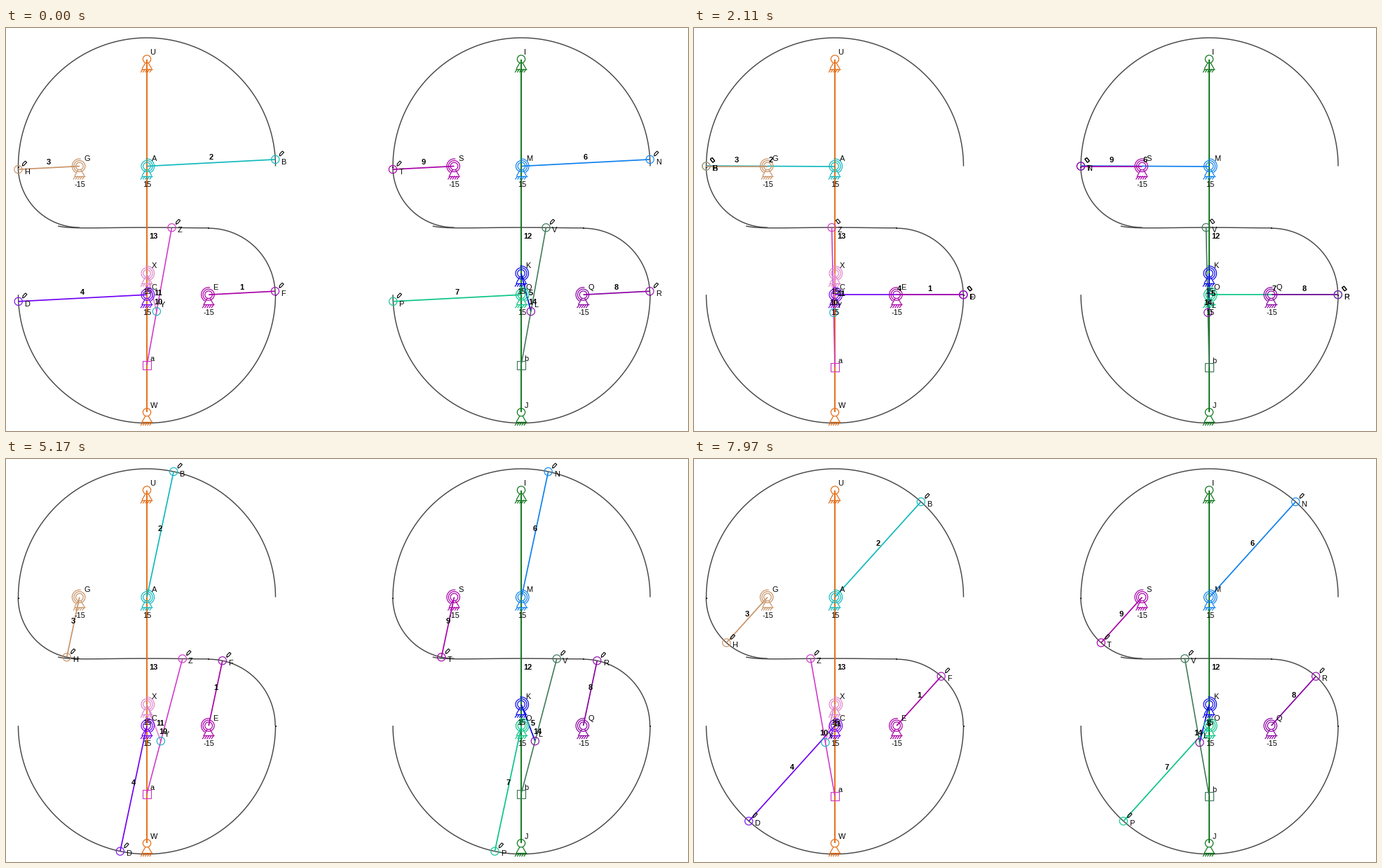
A matplotlib script for the animation above (8000 ms loop, 973 px wide and 576 px high).

```python
import numpy as np
import matplotlib.pyplot as plt
from matplotlib.animation import FuncAnimation

W, H, DPI = 973, 576, 100
LOOP, FRAMES, STEPS = 8000, 200, 103
PX = 72 / DPI
ARM_SHIFT, RAIL_SHIFT = 534.5, 534

plt.rcParams["font.family"] = "Liberation Sans"
fig = plt.figure(figsize=(W / DPI, H / DPI), dpi=DPI, facecolor="white")
ax = fig.add_axes([0, 0, 1, 1])
ax.set_xlim(-0.5, W - 0.5)
ax.set_ylim(H - 0.5, -0.5)
ax.axis("off")

# Left mechanism geometry; the right one is the same, shifted
CX = 200.5
TOP, BOT, CRANK = (CX, 197), (CX, 380.7), (CX, 350.2)
LEFT, RIGHT = (104.4, 197), (288.6, 380.7)
R_BIG, R_LEFT, R_RIGHT = 183.5, 87.6, 95
R_CRANK, ROD, RATIO = 56.1, 78, 2.56
SWING_LO, SWING_HI = -62, 38.2

# Arm travel in degrees at chosen steps, and crank travel against arm travel
STEP_KEYS = [0, 11, 18, 22, 33, 37, 44, 55, 66, 77, 88, 92, 99, 102]
ARM_KEYS = [-3, 72, 120, 147, 219, 243, 291, 360, 438, 510, 579, 603, 651, 672]
ARM_REF = [-3, 120, 243, 360, 510, 603, 672]
CRANK_REF = [76.3, 199.8, 324.5, 440.8, 590.2, 683.9, 753.6]


def bounce(x, span):
    """Back-and-forth travel between 0 and span."""
    x = x % (2 * span)
    return min(x, 2 * span - x)


def polar(c, r, deg):
    a = np.radians(deg)
    return c[0] + r * np.cos(a), c[1] - r * np.sin(a)


def shifted(p, dx):
    return p[0] + dx, p[1]


def swing(deg):
    """Crank pin, slider and tip for a crank angle measured from straight down."""
    a = np.radians(deg)
    dx = R_CRANK * np.sin(a)
    y = CRANK[1] + R_CRANK * np.cos(a)
    drop = np.sqrt(ROD ** 2 - dx ** 2)
    slide = y + drop
    return (CX + dx, y), (CX, slide), (CX + RATIO * dx, slide - RATIO * drop)


def line(xs, ys, color, lw=1.2, z=3):
    return ax.plot(xs, ys, color=color, lw=lw * PX, zorder=z,
                   solid_capstyle="butt", solid_joinstyle="miter")[0]


def text(x, y, s, ha="left", bold=False):
    return ax.text(x, y, s, ha=ha, va="baseline", size=11 * PX, color="black",
                   weight="bold" if bold else "normal", zorder=6)


def arc(c, r, a, b, color, lw=1.2, z=3):
    return line(*polar(c, r, np.linspace(a, b, 90)), color, lw, z)


RING = np.array(polar((0, 0), 5.6, np.linspace(0, 360, 40)))
BOX = np.array([[-6, 6, 6, -6, -6], [-6, -6, 6, 6, -6]])
PEN_UP = np.array([[-3, -2.6, 1, 3.2, -0.6, -3], [3.6, 0.4, -3.4, -1.6, 2.6, 3.6]])
PEN_FLAT = np.array([[-3.2, -0.4, 3.2, 0.4, -3.2], [-1.6, -3.6, 1, 3.2, -1.6]])


def place(art, shape, p, dx=0, dy=0):
    art.set_data(shape[0] + p[0] + dx, shape[1] + p[1] + dy)


def ground(p, color):
    x, y = p
    for s in (-1, 1):
        line([x + 2 * s, x + 7 * s], [y + 5.2, y + 14], color)
    line([x - 8, x + 8], [y + 14, y + 14], color)
    for k in range(5):
        hx = x - 5.5 + 3.2 * k
        line([hx, hx - 3.5], [y + 14, y + 19], color)


def anchor(p, color, name):
    ground(p, color)
    arc(p, 5.6, 0, 360, color)
    text(p[0] + 4.5, p[1] - 6, name)


def motor(p, color, name, rpm):
    ground(p, color)
    arc(p, 5.3, 0, 360, color)
    arc(p, 8, 0, 360, color)
    arc(p, 10.5, *((-60, 100) if rpm > 0 else (80, 240)), color)
    text(p[0] + 6.5, p[1] - 7.5, name)
    text(p[0] + 0.5, p[1] + 29.3, str(rpm), "center")


def trace(ox):
    style = "#464646", 1.45, 1
    arc(shifted(TOP, ox), R_BIG, 0, 180, *style)
    arc(shifted(BOT, ox), R_BIG, 180, 360, *style)
    arc(shifted(LEFT, ox), R_LEFT, 180, 270, *style)
    arc(shifted(RIGHT, ox), R_RIGHT, 0, 90, *style)
    _, _, (zx, zy) = swing(np.linspace(SWING_LO, SWING_HI, 120))
    line(zx + ox, zy, *style)
    for x, y in ((17, 198), (288.7, 285.6), (384, 381)):
        line([x + ox - 1, x + ox + 1], [y, y], "#222222", 2, 1)


class Tip:
    """Joint ring with its pen and letter."""

    def __init__(self, color, name):
        self.ring = line([], [], color)
        self.pen = line([], [], "black", 1.1, 5)
        self.name = text(0, 0, name)

    def update(self, p, pen):
        place(self.ring, RING, p)
        place(self.pen, pen, p, 9, -8.5)
        self.name.set_position((p[0] + 8.3, p[1] + 6.8))


class Arm:
    """Pivoted link with a pen at its free end."""

    def __init__(self, pivot, r, color, tip_color, names, num, rpm):
        self.pivot, self.r = pivot, r
        motor(pivot, color, names[0], rpm)
        self.link = line([], [], color, 1.7, 2)
        self.tip = Tip(tip_color, names[1])
        self.num = text(0, 0, num, "center", True)

    def update(self, deg, pen):
        p, q = self.pivot, polar(self.pivot, self.r, deg)
        self.link.set_data([p[0], q[0]], [p[1], q[1]])
        self.tip.update(q, pen)
        self.num.set_position(((p[0] + q[0]) / 2, (p[1] + q[1]) / 2 - 5))


class Rocker:
    """Crank, rod and slider that carry the middle pen."""

    def __init__(self, ox, rod, pin, crank, names, nums):
        x, y, z, a = names
        self.ox = ox
        self.pivot = shifted(CRANK, ox)
        motor(self.pivot, crank, x, 15)
        self.crank = line([], [], crank, 1.7, 2)
        self.rod = line([], [], rod, 1.6, 2)
        self.pin, self.box = line([], [], pin), line([], [], rod)
        self.tip = Tip(rod, z)
        self.pin_name, self.box_name = text(0, 0, y), text(0, 0, a)
        self.rod_num = text(0, 0, nums[0], "center", True)
        self.crank_num = text(0, 0, nums[1], "center", True)
        self.gap = 3.5 + 3 * len(nums[1])

    def update(self, deg, pen):
        y, a, z = [shifted(p, self.ox) for p in swing(deg)]
        x = self.pivot
        self.crank.set_data([x[0], y[0]], [x[1], y[1]])
        self.rod.set_data([a[0], z[0]], [a[1], z[1]])
        place(self.pin, RING, y)
        place(self.box, BOX, a)
        self.tip.update(z, pen)
        self.pin_name.set_position((y[0] + 4.5, y[1] - 6.5))
        self.box_name.set_position((a[0] + 4.5, a[1] - 5.5))
        self.rod_num.set_position(((y[0] + a[0] + z[0]) / 3,
                                   (y[1] + a[1] + z[1]) / 3 + 4))
        self.crank_num.set_position(((x[0] + y[0]) / 2 + self.gap,
                                     (x[1] + y[1]) / 2 + 4))


class Mechanism:
    def __init__(self, arm_dx, rail_dx, rail, rail_names, rail_num, arms, rocker):
        trace(arm_dx)
        x = CX + rail_dx
        line([x, x], [44, 548.7], rail, 1.9, 2)
        for y, name in zip((44, 548.7), rail_names):
            anchor((x, y), rail, name)
        text(x + 9.6, 300.5, rail_num, "center", True)
        spots = [(TOP, R_BIG, 15), (LEFT, R_LEFT, -15),
                 (BOT, R_BIG, 15), (RIGHT, R_RIGHT, -15)]
        self.arms = [Arm(shifted(c, arm_dx), r, col, tip, names, num, rpm)
                     for (c, r, rpm), (col, tip, names, num) in zip(spots, arms)]
        self.rocker = Rocker(rail_dx, *rocker)

    def update(self, wide, narrow, crank, pen):
        for arm, deg in zip(self.arms, (wide, 180 + narrow, 180 + wide, narrow)):
            arm.update(deg, pen)
        self.rocker.update(crank, pen)


MECHS = [
    Mechanism(0, 0, "#e46c14", "UW", "13",
              [("#10b8bc", "#10b8c4", "AB", "2"),
               ("#c89468", "#c89468", "GH", "3"),
               ("#7000f4", "#7c10f0", "CD", "4"),
               ("#a800a4", "#a010b8", "EF", "1")],
              ("#d038c8", "#20b4c0", "#e088cc", "XYZa", ("10", "11"))),
    Mechanism(ARM_SHIFT, RAIL_SHIFT, "#0c7418", "IJ", "12",
              [("#0c80ec", "#1488ec", "MN", "6"),
               ("#a800a8", "#a800a8", "ST", "9"),
               ("#08c488", "#10c490", "OP", "7"),
               ("#8800a0", "#9410b0", "QR", "8")],
              ("#3c7858", "#8c10a8", "#0808e8", "KLVb", ("14", "5"))),
]


def draw(i):
    t = (i + 0.5) * LOOP / FRAMES
    step = int(t * STEPS / LOOP)
    arm = 3 * round(np.interp(step, STEP_KEYS, ARM_KEYS) / 3)
    wide, narrow = bounce(arm, 180), bounce(arm, 90)
    travel = np.interp(arm, ARM_REF, CRANK_REF)
    crank = SWING_LO + bounce(travel, SWING_HI - SWING_LO)
    pen = PEN_UP if wide < 90 else PEN_FLAT
    for m in MECHS:
        m.update(wide, narrow, crank, pen)
    return []


anim = FuncAnimation(fig, draw, frames=FRAMES, interval=LOOP // FRAMES,
                     init_func=lambda: draw(0), repeat=True, repeat_delay=0)
plt.show()
```
